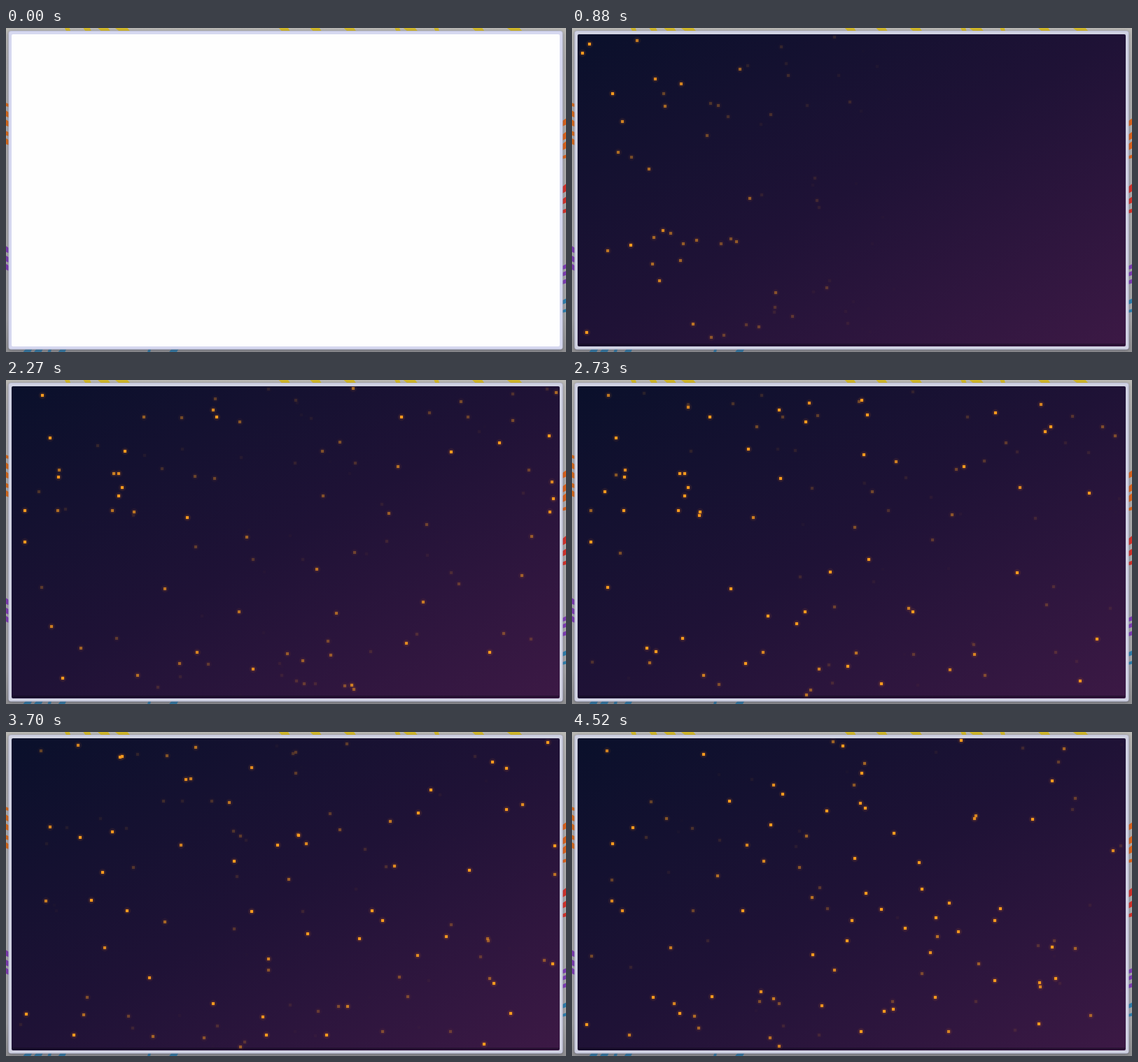
An HTML page with a canvas for the animation above (4.55 s loop, 800 by 464 pixels).

```html
<!DOCTYPE html>
<html lang="en">
<head>
<meta charset="utf-8">
<title>Ember field</title>
<style>
  html, body { margin: 0; width: 100%; height: 100%; overflow: hidden; background: #aaa; }
  canvas { display: block; }
</style>
</head>
<body>
<canvas id="stage" width="800" height="464"></canvas>
<script>
const LOOP = 4550;
const FLASH = 30;
const EMBERS = 125;
const WIDTH = 800;
const HEIGHT = 464;
const panel = { x: 8, y: 9, w: 783, h: 447 };
const ctx = document.getElementById("stage").getContext("2d");

function seeded(seed) {
  const next = () => {
    seed = (seed + 0x6D2B79F5) | 0;
    let n = Math.imul(seed ^ (seed >>> 15), 1 | seed);
    n = (n + Math.imul(n ^ (n >>> 7), 61 | n)) ^ n;
    return ((n ^ (n >>> 14)) >>> 0) / 4294967296;
  };
  return (a, b) => a + (b - a) * next();
}

function makeLayer(width, height, paint) {
  const layer = document.createElement("canvas");
  layer.width = width;
  layer.height = height;
  paint(layer.getContext("2d"));
  return layer;
}

// The first embers light up in a sweep from left to right. Each one glows,
// dies and reappears nearby, so the sweep slowly dissolves.
function makeEmbers() {
  const between = seeded(27);
  const embers = [];
  for (let i = 0; i < EMBERS; i++) {
    const column = between(10, 788);
    let birth = 380 + 1.08 * column + between(-60, 60);
    while (birth < LOOP) {
      const life = between(1000, 2000);
      const x = Math.abs(column + between(-50, 50) - 10) + 10;
      embers.push({
        x: Math.round(x > 788 ? 1576 - x : x),
        y: Math.round(between(12, 453)),
        birth,
        life
      });
      birth += life;
    }
  }
  return embers;
}

function paintEmber(c) {
  const halo = c.createRadialGradient(10, 10, 1, 10, 10, 6);
  halo.addColorStop(0, "rgba(255,140,20,.34)");
  halo.addColorStop(0.5, "rgba(255,130,20,.13)");
  halo.addColorStop(1, "rgba(255,130,20,0)");
  c.fillStyle = halo;
  c.fillRect(0, 0, 20, 20);
  c.fillStyle = "#f89a1e";
  c.fillRect(8, 8, 4, 4);
}

// Slivers of coloured wallpaper showing around the panel.
function paintSpecks(c) {
  const between = seeded(8);
  const groups = [
    { color: "#d2b829", side: "top", from: 72, to: 182, count: 4 },
    { color: "#d2b829", side: "top", from: 388, to: 743, count: 8 },
    { color: "#d86a1a", side: "left", from: 104, to: 169, count: 5 },
    { color: "#7d3bb0", side: "left", from: 311, to: 350, count: 3 },
    { color: "#dc631c", side: "right", from: 129, to: 193, count: 4 },
    { color: "#d5322a", side: "right", from: 220, to: 270, count: 3 },
    { color: "#7f3db4", side: "right", from: 338, to: 367, count: 3 },
    { color: "#2f80ad", side: "right", from: 387, to: 408, count: 2 },
    { color: "#3479a2", side: "bottom", from: 22, to: 88, count: 4 },
    { color: "#3479a2", side: "bottom", from: 160, to: 282, count: 2 }
  ];
  for (const { color, side, from, to, count } of groups) {
    const flat = side === "top" || side === "bottom";
    const far = side === "bottom" ? HEIGHT : side === "right" ? WIDTH : 0;
    const inward = far ? -5 : 5;
    const step = (to - from) / count;
    c.fillStyle = color;
    for (let i = 0; i < count; i++) {
      const size = Math.min(step * 0.8, between(5, 28));
      const at = from + step * i + between(0, step - size);
      const corners = [[at, 0], [at + size * 0.8, 0], [at + size, 1], [at + size * 0.3, 1]];
      c.beginPath();
      for (const [along, depth] of corners) {
        const across = far + depth * inward;
        c.lineTo(flat ? along : across, flat ? across : along);
      }
      c.fill();
    }
  }
}

function fillRound(c, x, y, w, h, radius, color) {
  c.fillStyle = color;
  c.beginPath();
  c.roundRect(x, y, w, h, radius);
  c.fill();
}

// Diagonal gradient in which both off-diagonal corners share the middle colour.
function nightGradient(c, { x, y, w, h }) {
  const k = w * h / (w * w + h * h);
  const cx = x + w / 2;
  const cy = y + h / 2;
  const night = c.createLinearGradient(cx - h * k, cy - w * k, cx + h * k, cy + w * k);
  night.addColorStop(0, "#0a102b");
  night.addColorStop(0.5, "#1f1236");
  night.addColorStop(1, "#3c1945");
  return night;
}

function paintScene(c, dark) {
  const { x, y, w, h } = panel;
  const wall = c.createLinearGradient(0, 0, 0, HEIGHT);
  wall.addColorStop(0, "#b9b8b4");
  wall.addColorStop(0.1, "#afaeae");
  wall.addColorStop(0.9, "#a5a5a7");
  wall.addColorStop(1, "#8e8e90");
  c.fillStyle = wall;
  c.fillRect(0, 0, WIDTH, HEIGHT);
  paintSpecks(c);

  c.save();
  c.shadowColor = "rgba(35,35,55,.4)";
  c.shadowBlur = 4;
  c.shadowOffsetY = 1;
  fillRound(c, 3.5, 4, 792, 456.5, 4, "#c0c3db");
  c.restore();
  fillRound(c, 4.5, 5, 790, 454.5, 3, dark ? "#d0d2e2" : "#d6d8f0");

  fillRound(c, x, y, w, h, 2, dark ? nightGradient(c, panel) : "#fefefe");
  if (dark) {
    c.fillStyle = "rgba(8,5,18,.35)";
    c.fillRect(x + 1, y + h - 4, w - 2, 3);
  }
}

function glowAt({ birth, life }, time) {
  const age = (time - birth) / life;
  if (age <= 0 || age >= 1) return 0;
  return Math.min(1, 1.3 * Math.sin(Math.PI * age) ** 2);
}

const embers = makeEmbers();
const ember = makeLayer(20, 20, paintEmber);
const blank = makeLayer(WIDTH, HEIGHT, c => paintScene(c, false));
const night = makeLayer(WIDTH, HEIGHT, c => paintScene(c, true));

function draw(time) {
  ctx.drawImage(time < FLASH ? blank : night, 0, 0);
  if (time < FLASH) return;
  ctx.save();
  ctx.beginPath();
  ctx.rect(panel.x, panel.y, panel.w, panel.h);
  ctx.clip();
  for (const dot of embers) {
    ctx.globalAlpha = glowAt(dot, time);
    if (ctx.globalAlpha > 0) ctx.drawImage(ember, dot.x - 10, dot.y - 10);
  }
  ctx.restore();
}

const start = performance.now();
function tick() {
  draw((performance.now() - start) % LOOP);
  requestAnimationFrame(tick);
}
tick();
</script>
</body>
</html>
```
